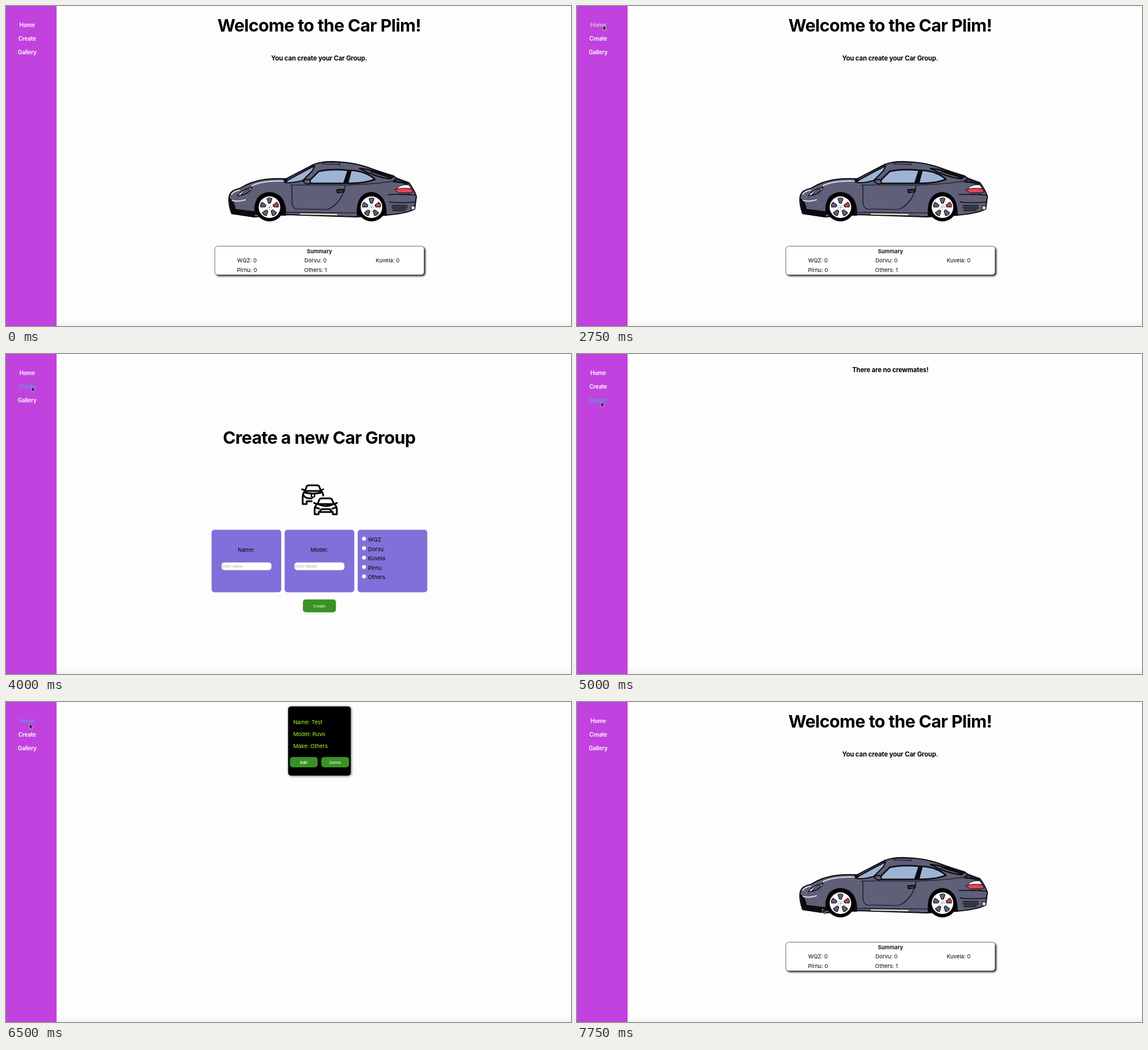
An HTML page for the animation above (8000 ms loop, 994 px wide and 563 px high).

```html
<!DOCTYPE html>
<html lang="en">
<head>
<meta charset="utf-8">
<title>Car groups</title>
<style>
  html, body { margin: 0; width: 100%; height: 100%; overflow: hidden; background: #fdfdfd; }
  svg { display: block; width: 100vw; height: 100vh; }
  text { font: 9.6px Inter, Roboto, sans-serif; font-optical-sizing: none; }
  .mid text, text.mid { text-anchor: middle; }
  .h1 { font-size: 30.5px; font-weight: 700; letter-spacing: -.021em; }
  .h3 { font-size: 11.3px; font-weight: 700; letter-spacing: -.01em; }
  .bold { font-weight: 600; }
  .small { font-size: 6.8px; }
  .nav text { font-size: 9.9px; font-weight: 600; letter-spacing: -.015em; fill: #fff; }
  .panel { fill: #826fd9; }
  .button { fill: #3a9226; }
  .hint { font-size: 6.8px; fill: #aaa; }
  .summary { filter: drop-shadow(2px 2px 1.8px #223); }
  .card { filter: drop-shadow(1px 1px 2px #0008); }
  .lime { fill: #adff2f; }

  .page, .link, #cursor { animation: 8s step-end infinite; }
  #home { animation-name: home; }
  #create { animation-name: create; }
  #empty { animation-name: empty; }
  #gallery { animation-name: gallery; }
  #link-home { animation-name: link-home; }
  #link-create { animation-name: link-create; }
  #link-gallery { animation-name: link-gallery; }
  #cursor { animation-name: cursor; }

  @keyframes home { 0%, 84.375%, 100% { visibility: visible } 50% { visibility: hidden } }
  @keyframes create { 0%, 62.5%, 100% { visibility: hidden } 50% { visibility: visible } }
  @keyframes empty { 0%, 65.625%, 100% { visibility: hidden } 62.5% { visibility: visible } }
  @keyframes gallery { 0%, 84.375%, 100% { visibility: hidden } 65.625% { visibility: visible } }

  @keyframes link-home {
    0%, 37.5%, 93.75%, 100% { fill: #fff }
    34.375%, 75% { fill: #ccc }
    78.125% { fill: #5c98ea }
  }
  @keyframes link-create {
    0%, 40.625%, 56.25%, 75%, 100% { fill: #fff }
    37.5%, 43.75%, 71.875% { fill: #ccc }
    50% { fill: #5c98ea }
  }
  @keyframes link-gallery {
    0%, 43.75%, 71.875%, 100% { fill: #fff }
    40.625%, 59.375% { fill: #ccc }
    62.5% { fill: #5c98ea }
  }
  @keyframes cursor {
    0%, 100% { transform: translate(-20px, -20px) }
    12.5% { transform: translate(508px, 268px) }
    15.625% { transform: translate(490px, 246px) }
    18.75% { transform: translate(482px, 236px) }
    21.875% { transform: translate(470px, 230px) }
    25% { transform: translate(400px, 205px) }
    28.125% { transform: translate(230px, 125px) }
    31.25% { transform: translate(67px, 45px) }
    34.375% { transform: translate(46px, 34px) }
    37.5% { transform: translate(44px, 57px) }
    40.625% { transform: translate(42px, 80px) }
    43.75% { transform: translate(45px, 60px) }
    46.875% { transform: translate(45.5px, 57.5px) }
    56.25% { transform: translate(43px, 70px) }
    59.375% { transform: translate(42.5px, 84.5px) }
    71.875% { transform: translate(43px, 58px) }
    75% { transform: translate(41.5px, 38.5px) }
    93.75% { transform: translate(210px, 190px) }
    96.875% { transform: translate(432px, 364px) }
  }
</style>
</head>
<body>
<svg viewBox="0 0 994 563">
  <defs>
    <linearGradient id="fade" x2="0" y2="1">
      <stop stop-color="#fdfdfd"/><stop offset="1" stop-color="#f3f3f3"/>
    </linearGradient>
    <path id="hole" d="M-4.5-15Q0-18 4.5-15L2-7.5Q0-6-2-7.5Z"/>
    <g id="wheel">
      <circle r="25"/>
      <circle r="19" fill="#fff"/>
      <g fill="#5f5f78" stroke="#111" stroke-width="1.1">
        <use href="#hole"/>
        <use href="#hole" transform="rotate(72)" fill="#b94450"/>
        <use href="#hole" transform="rotate(144)"/>
        <use href="#hole" transform="rotate(216)"/>
        <use href="#hole" transform="rotate(288)"/>
      </g>
      <circle r="3.6" fill="none" stroke="#333" stroke-dasharray="1.4 3.1"/>
      <circle r="1.4" fill="#999"/>
    </g>
  </defs>

  <rect width="994" height="563" fill="#fdfdfd"/>
  <rect y="551" width="994" height="12" fill="url(#fade)"/>
  <rect width="89" height="563" fill="#c142de"/>
  <g class="nav mid">
    <text class="link" id="link-home" x="37.3" y="37">Home</text>
    <text class="link" id="link-create" x="37.3" y="60.7">Create</text>
    <text class="link" id="link-gallery" x="37.3" y="84.5">Gallery</text>
  </g>

  <g class="page mid" id="home">
    <text class="h1" x="551" y="45.3">Welcome to the Car Plim!</text>
    <text class="h3" x="551" y="95.7">You can create your Car Group.</text>

    <g stroke="#0b0b10" stroke-width="2" stroke-linejoin="round" stroke-linecap="round" fill="none">
      <path fill="#5f5f78" d="M393 333Q396 324 411 321Q432 308 456 305Q475 303 493 304L541 279Q556 273 580 274Q610 275 634 283Q661 293 682 299L687 303L709 311Q719 325 722 335L719 357Q706 365 669 368L615 371L492 367L437 371L397 365Q390 346 393 333Z"/>
      <path fill="#0b0b10" d="M394 340Q401 343 403 358L436 362L437 371L397 365ZM438 366Q435 330 464 328Q493 331 492 368ZM618 369Q616 330 643 328Q669 331 669 368Z"/>
      <path fill="#9db3d3" d="M493 308Q516 295 543 281L539 290L522 307Q508 311 494 311Z"/>
      <path fill="#9db3d3" stroke-width="2.6" d="M529 312L550 291Q571 286 602 289L595 312ZM607 289Q634 291 649 305Q632 312 601 312Z"/>
      <path fill="#0b0b10" d="M602 289H607L600 312H594Z"/>
      <path stroke-width="1.2" d="M500 315H598Q662 313 690 306M503 316V345Q504 356 511 357L566 358Q590 348 597 316M493 363L618 364M557 278L560 275H586L588 279Z"/>
      <path fill="#5f5f78" d="M523 309Q526 303 534 306Q538 311 533 313Q526 313 523 309Z"/>
      <path fill="#0b0b10" stroke-width="1" d="M487 307Q493 303 496 307L491 311ZM582 323L596 322L595 327L583 329Z"/>
      <path stroke="#85859a" stroke-width="1" d="M585 326L593 325"/>
      <path stroke-width="2.4" d="M622 286Q632 286 653 292L682 300L676 304Q649 301 622 286M642 291L678 302M687 303L682 309L709 312"/>
      <path stroke-width="1.4" d="M690 306L706 316M692 305L710 316M672 332Q695 330 721 333M694 332L711 331"/>
      <path fill="#f5f3ee" stroke-width="1" d="M691 318Q699 313 709 315L713 321L688 322Z"/>
      <path fill="#ee4058" stroke-width="1" d="M684 323Q697 319 714 322L716 328L692 329Z"/>
      <path stroke-width="1.5" d="M679 351H706M679 354H706M680 357H705M681 360H702M674 345Q697 347 719 345"/>
      <circle cx="716" cy="355" r="3.5" fill="#ddd" stroke-width="1.2"/>
      <path fill="#d9dfeb" stroke-width="1.3" d="M407 334Q414 323 433 319Q430 328 418 332Z"/>
      <path fill="#5f5f78" stroke-width="1" d="M414 331Q419 324 429 322Q427 328 419 331Z"/>
      <path stroke="#d7d7df" stroke-width="2.2" d="M397 331Q402 325 411 324M433 316Q452 307 488 308M398 342Q408 345 421 341"/>
      <path stroke="#f4eed4" stroke-width="2.2" d="M518 366L582 367"/>
    </g>
    <use href="#wheel" x="463.5" y="354"/>
    <use href="#wheel" x="643" y="354"/>

    <rect class="summary" x="367.5" y="422.5" width="368" height="50.5" rx="5" fill="#fff" stroke="#555" stroke-width=".8"/>
    <text class="bold" x="551.5" y="434.5">Summary</text>
    <text x="424" y="451">WQZ: 0</text>
    <text x="544.5" y="451">Dorvu: 0</text>
    <text x="671.5" y="451">Kuvela: 0</text>
    <text x="424" y="468">Pirnu: 0</text>
    <text x="544.5" y="468">Others: 1</text>
  </g>

  <g class="page" id="create">
    <text class="h1 mid" x="551" y="158.3">Create a new Car Group</text>

    <g fill="none" stroke="#000" stroke-width="3" stroke-linecap="round" stroke-linejoin="round">
      <path d="M526 241L529 233Q530 231 533 231H547Q550 231 551 233L554 241M521 238L526 240M558 238L554 240M526 241H554Q558 244 558 249M526 241Q522 245 522 251V264H529V259H538M523 248Q527 254 534 254H538M526 244Q540 247 554 244"/>
      <circle cx="540" cy="249" r="3" stroke-width="2.2"/>
      <path d="M548 264L551 257Q552 254 555 254H570Q573 254 574 257L577 264M542 262L547 264M582 262L577 264M548 264H577Q582 267 582 273V282H575V278H550V282H543V273Q543 267 548 264M544 270L551 272M581 270L574 272M551 265Q562 270 574 265M552 277L555 273H570L573 277"/>
    </g>

    <rect class="panel" x="361.7" y="309.3" width="122.5" height="110" rx="5"/>
    <rect class="panel" x="490.2" y="309.3" width="122.5" height="110" rx="5"/>
    <rect class="panel" x="618.7" y="309.3" width="122.5" height="110" rx="5"/>
    <text class="mid" x="422.7" y="348">Name:</text>
    <text class="mid" x="551.2" y="348">Model:</text>
    <g fill="#fff">
      <rect x="379" y="366.8" width="88" height="13.4" rx="5"/>
      <rect x="507.4" y="366.8" width="88" height="13.4" rx="5"/>
      <g stroke="#777" stroke-width=".5">
        <circle cx="629.8" cy="325" r="3.8"/>
        <circle cx="629.8" cy="341.6" r="3.8"/>
        <circle cx="629.8" cy="358.2" r="3.8"/>
        <circle cx="629.8" cy="374.7" r="3.8"/>
        <circle cx="629.8" cy="391.2" r="3.8"/>
      </g>
    </g>
    <text class="hint" x="379.8" y="376">Enter name</text>
    <text class="hint" x="508.2" y="376">Enter Model</text>
    <text x="637" y="330">WQZ</text>
    <text x="637" y="346.6">Dorvu</text>
    <text x="637" y="363.2">Kuvela</text>
    <text x="637" y="379.8">Pirnu</text>
    <text x="637" y="396.4">Others</text>
    <rect class="button" x="522.3" y="431.8" width="58.2" height="22.6" rx="5"/>
    <text class="small mid" x="551.3" y="445.6" fill="#fff">Create</text>
  </g>

  <g class="page mid" id="empty">
    <text class="h3" x="551.3" y="31.5">There are no crewmates!</text>
  </g>

  <g class="page" id="gallery">
    <rect class="card" x="496.3" y="7.8" width="110.3" height="121.7" rx="5"/>
    <g class="lime">
      <text x="505.4" y="39.2">Name: Test</text>
      <text x="505.4" y="60">Model: Ruvo</text>
      <text x="505.4" y="80.8">Make: Others</text>
    </g>
    <rect class="button" x="499.5" y="96.8" width="48.8" height="18.2" rx="5"/>
    <rect class="button" x="554.7" y="96.8" width="48.8" height="18.2" rx="5"/>
    <g class="mid" fill="#fff">
      <text class="small bold" x="523.8" y="108.6">Edit</text>
      <text class="small" x="579" y="108.6">Delete</text>
    </g>
  </g>

  <path id="cursor" d="M0 0V8.6L1.9 6.9L3.3 10L4.7 9.4L3.4 6.3H6Z" stroke="#fff" stroke-width=".6"/>
</svg>
</body>
</html>
```
